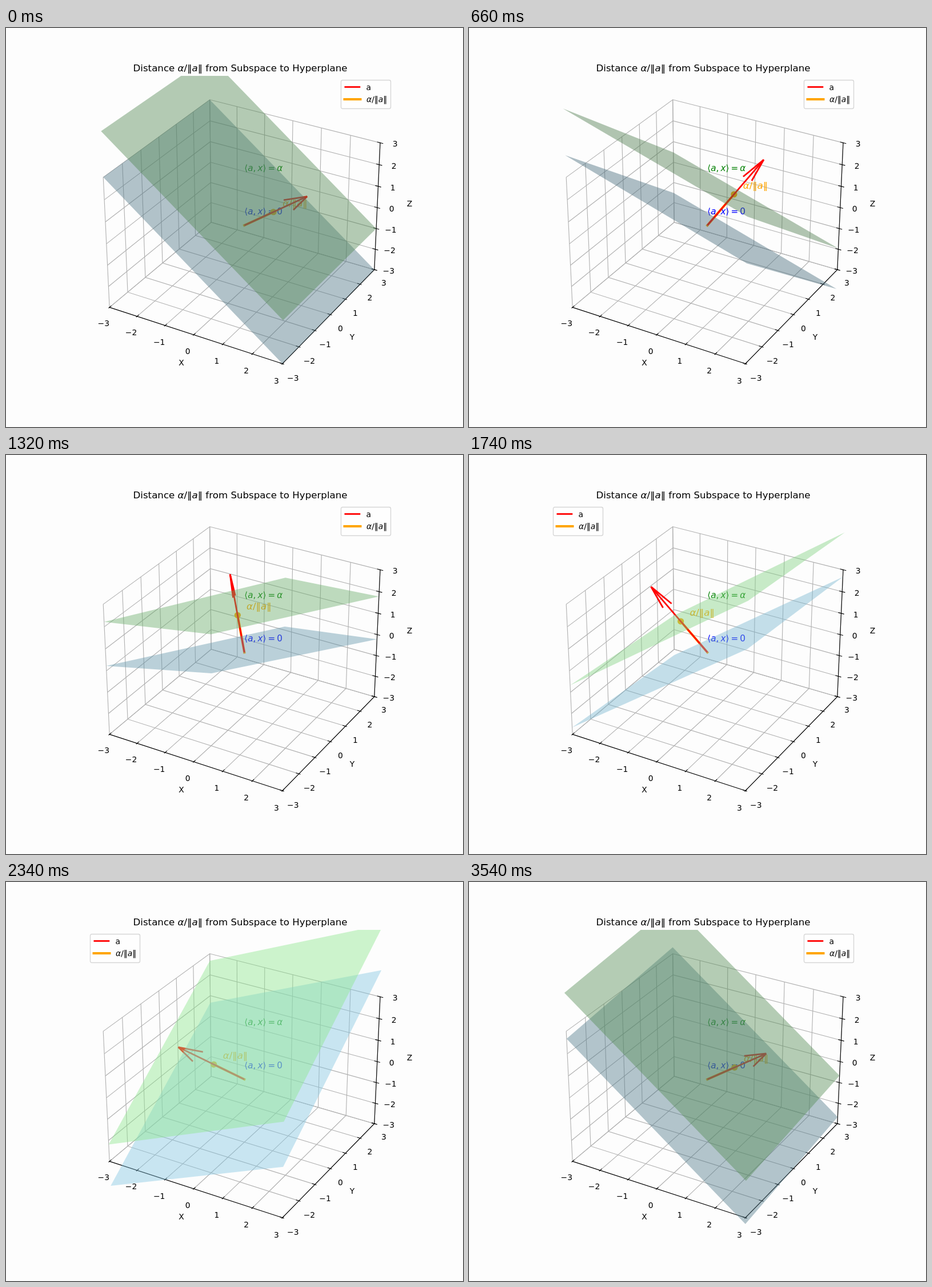
Write an HTML page with a canvas that moves like this. It is 800x700 px and loops after 3600 ms.

```html
<!DOCTYPE html>
<html lang="en">
<head>
<meta charset="utf-8">
<title>Distance from Subspace to Hyperplane</title>
<style>
  html, body { margin: 0; width: 100%; height: 100%; overflow: hidden; background: #fdfdfd; }
  canvas { display: block; }
</style>
</head>
<body>
<canvas id="stage" width="800" height="700"></canvas>
<script>
const ctx = document.getElementById('stage').getContext('2d');
const STEPS = 60, STEP_MS = 60;
const PT = 100 / 72;
const LIM = 3;
const TICKS = [-3, -2, -1, 0, 1, 2, 3];
const OFFSET = 2;                 // height of the hyperplane above the subspace
const LENGTH = 3;                 // length of vector a
const PLANE_ALPHA = 0.43;
const SKY = [135, 206, 235], LEAF = [144, 238, 144];
const LIGHT = [-2 / 3, -2 / 3, 1 / 3];
const FONT = '"DejaVu Sans", sans-serif';

// Perspective camera: azimuth -60 deg, elevation 30 deg, distance 10
const SIN60 = Math.sqrt(3) / 2;
const XY_SCALE = 0.198412, Z_SCALE = 0.148809;
const CENTER = [417.28, 346.22], ZOOM = 2913.5;

function depth([x, y, z]) {
  return 10 - XY_SCALE * (SIN60 / 2 * x - 0.75 * y) - Z_SCALE * z / 2;
}

function project(p) {
  const [x, y, z] = p;
  const k = ZOOM / depth(p);
  const right = XY_SCALE * (SIN60 * x + y / 2);
  const up = XY_SCALE * (-x / 4 + SIN60 / 2 * y) + Z_SCALE * SIN60 * z;
  return [CENTER[0] + k * right, CENTER[1] - k * up];
}

function trace(points) {
  ctx.beginPath();
  points.forEach(p => ctx.lineTo(...project(p)));
}

function line(points, color, points72, cap = 'butt') {
  trace(points);
  ctx.strokeStyle = color;
  ctx.lineWidth = points72 * PT;
  ctx.lineCap = cap;
  ctx.stroke();
}

function text(str, x, y, size, color = '#000', align = 'center', style = '') {
  ctx.font = `${style} ${size * PT}px ${FONT}`;
  ctx.textAlign = align;
  ctx.fillStyle = color;
  ctx.fillText(str, x, y);
  return ctx.measureText(str).width;
}

// Letters are slanted, '_' is a math space
function math(str, x, y, size, color) {
  for (const ch of str) {
    if (ch === '_') x += 0.195 * size * PT;
    else x += text(ch, x, y, size, color, 'left', /[a-zα]/.test(ch) ? 'italic' : '');
  }
  return x;
}

const NORM = 'α/‖a‖';

function mathWidth(str, size) {
  let width = 0;
  for (const ch of str) {
    ctx.font = `${/[a-zα]/.test(ch) ? 'italic' : ''} ${size * PT}px ${FONT}`;
    width += ctx.measureText(ch).width;
  }
  return width;
}

function drawTitle() {
  const head = 'Distance ', tail = ' from Subspace to Hyperplane';
  ctx.font = `${12 * PT}px ${FONT}`;
  const plain = ctx.measureText(head).width + ctx.measureText(tail).width;
  let x = 410 - (plain + mathWidth(NORM, 12)) / 2;
  x += text(head, x, 75.7, 12, '#000', 'left');
  x = math(NORM, x, 75.7, 12, '#000');
  text(tail, x, 75.7, 12, '#000', 'left');
}

function label(str, p) {
  const [x, y] = project(p);
  text(str, x, y + 5, 10);
}

function drawAxes() {
  for (const t of TICKS) {
    line([[t, -LIM, -LIM], [t, LIM, -LIM], [t, LIM, LIM]], '#b0b0b0', 0.8);
    line([[LIM, t, -LIM], [-LIM, t, -LIM], [-LIM, t, LIM]], '#b0b0b0', 0.8);
    line([[-LIM, -LIM, t], [-LIM, LIM, t], [LIM, LIM, t]], '#b0b0b0', 0.8);
  }
  line([[-LIM, -LIM, -LIM], [LIM, -LIM, -LIM], [LIM, LIM, -LIM], [LIM, LIM, LIM]], '#000', 0.8, 'square');

  const outer = LIM + 0.05, inner = LIM - 0.1;
  for (const t of TICKS) {
    line([[t, -outer, -LIM], [t, -inner, -LIM]], '#000', 0.8);
    line([[outer, t, -LIM], [inner, t, -LIM]], '#000', 0.8);
    line([[outer + 0.05, LIM, t], [inner, LIM, t]], '#000', 0.8);
    const name = String(t).replace('-', '−');
    label(name, [t, -3.35, -3.51]);
    label(name, [3.35, t, -3.51]);
    label(name, [3.42, 3.16, t]);
  }
  text('X', 307, 592, 10);
  text('Y', 606, 546.5, 10);
  text('Z', 706.5, 312.5, 10);
}

function drawLegend(left) {
  ctx.save();
  ctx.translate(left ? 147.5 : 586.5, 91.5);
  ctx.beginPath();
  ctx.roundRect(0, 0, 87, 50, 2.8);
  ctx.fillStyle = 'rgba(255,255,255,0.8)';
  ctx.fill();
  ctx.strokeStyle = 'rgba(204,204,204,0.8)';
  ctx.lineWidth = PT;
  ctx.stroke();
  ctx.fillStyle = '#f00';
  ctx.fillRect(6, 10.6, 27.8, 2.8);
  ctx.fillStyle = '#ffa500';
  ctx.fillRect(4, 31.5, 32, 4.1);
  text('a', 44, 17, 10, '#000', 'left');
  math(NORM, 44.5, 38.5, 10, '#000');
  ctx.restore();
}

function planeCorners(c, s, lift) {
  return [[-LIM, -LIM], [LIM, -LIM], [LIM, LIM], [-LIM, LIM]]
    .map(([x, y]) => [x, y, lift - x * c - y * s]);
}

function drawPlane(corners, color, shade) {
  trace(corners);
  const rgb = color.map(v => Math.round(v * shade));
  ctx.fillStyle = `rgba(${rgb},${PLANE_ALPHA})`;
  ctx.fill();
}

const nearest = points => Math.min(...points.map(depth));

function draw(step) {
  const angle = step / STEPS * 2 * Math.PI;
  const c = Math.cos(angle), s = Math.sin(angle);
  const origin = [0, 0, 0], foot = [c, s, 1];
  const tip = foot.map(v => v * LENGTH / Math.SQRT2);
  const barbs = [30, 60].map(deg => {
    const r = deg * Math.PI / 180, size = 0.3 * LENGTH;
    return [tip[0] - size * Math.cos(r) * c, tip[1] - size * Math.cos(r) * s, tip[2] - size * Math.sin(r)];
  });
  const subspace = planeCorners(c, s, 0), hyperplane = planeCorners(c, s, OFFSET);
  const glow = (LIGHT[0] * c + LIGHT[1] * s + LIGHT[2]) / Math.SQRT2;
  const shade = 0.3 + 0.35 * (1 + glow);

  ctx.fillStyle = '#fdfdfd';
  ctx.fillRect(0, 0, 800, 700);
  drawAxes();
  drawTitle();

  ctx.save();
  ctx.beginPath();
  ctx.rect(140.5, 84, 539, 539);
  ctx.clip();
  line([origin, foot], '#ffa500', 3, 'square');
  math('⟨a,_x⟩_=_0', ...project([0, 0, 0.5]), 11, '#00f');
  math('⟨a,_x⟩_=_α', ...project([0, 0, OFFSET + 0.5]), 11, '#008000');
  math(NORM, ...project(foot.map(v => v + 0.2)), 12, '#ffa500');

  ctx.beginPath();
  ctx.arc(...project(foot), 5.6, 0, 2 * Math.PI);
  ctx.fillStyle = '#ffa500';
  ctx.fill();

  const drawArrow = () => [[origin, tip], [tip, barbs[0]], [tip, barbs[1]]]
    .forEach(segment => line(segment, '#f00', 2));
  const arrowInFront = nearest([origin, tip, ...barbs]) < nearest(subspace);
  if (!arrowInFront) drawArrow();
  drawPlane(subspace, SKY, shade);
  if (arrowInFront) drawArrow();
  drawPlane(hyperplane, LEAF, shade);
  ctx.restore();

  // The legend moves aside while the hyperplane reaches its corner
  drawLegend(step >= 29 && step <= 48);
}

function tick(now) {
  draw(Math.floor(now / STEP_MS) % STEPS);
  requestAnimationFrame(tick);
}
draw(0);
requestAnimationFrame(tick);
</script>
</body>
</html>
```
